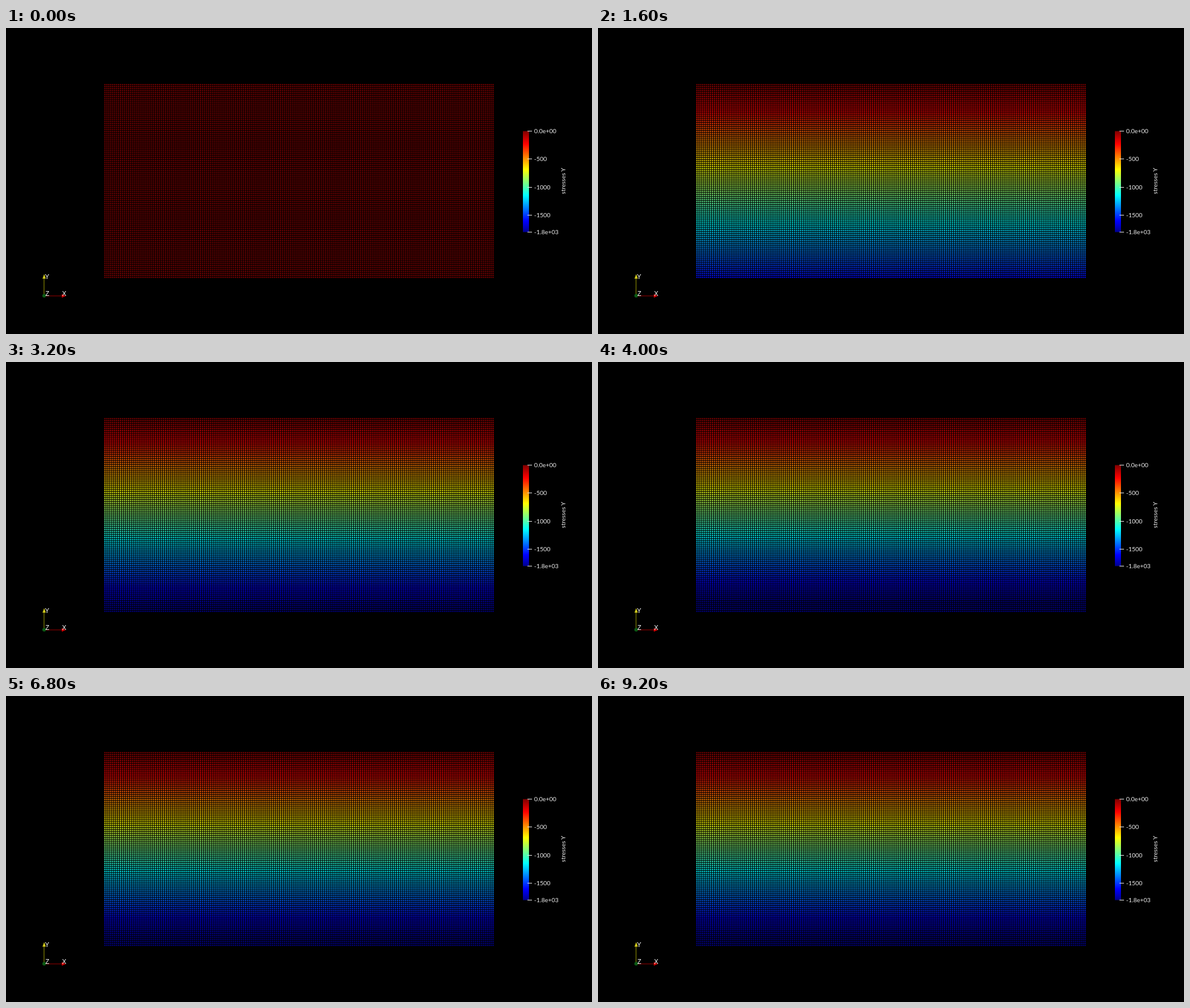
An HTML page with a canvas for the animation above (9600 ms loop, 967 by 506 pixels).

```html
<!DOCTYPE html>
<html lang="en">
<head>
<meta charset="utf-8">
<title>Vertical stress in a settling block</title>
<style>
  html, body { margin: 0; width: 100%; height: 100%; overflow: hidden; background: #000; }
  canvas, svg { position: absolute; left: 0; top: 0; width: 967px; height: 506px; }
  text { font-family: Lato, "Liberation Sans", sans-serif; font-size: 10px; fill: #ececec; }
  .axis text { font-family: "Liberation Sans", sans-serif; font-size: 10.5px; fill: #fff; }
</style>
</head>
<body>
<canvas id="field" width="967" height="506"></canvas>
<svg viewBox="0 0 967 506" xmlns="http://www.w3.org/2000/svg">
  <defs><linearGradient id="jet" x1="0" y1="1" x2="0" y2="0"></linearGradient></defs>
  <rect x="853" y="170.5" width="10" height="167" fill="url(#jet)"/>
  <g id="ticks"></g>
  <text transform="translate(923 253) rotate(-90)" text-anchor="middle">stresses Y</text>
  <g class="axis">
    <path d="M63 443H92" stroke="#960000"/>
    <path d="M62.8 442V414" stroke="#969600"/>
    <path d="M92 440L99 443L92 446Z" fill="#d00000"/>
    <path d="M60.2 414.5L63 407L65.8 414.5Z" fill="#d0c81c"/>
    <circle cx="63" cy="442.8" r="3" fill="#0c5a14"/>
    <text x="92.5" y="442.6">X</text>
    <text x="64.3" y="414.8">Y</text>
    <text x="65" y="442.6">Z</text>
  </g>
</svg>
<script>
const W = 967, H = 506;
const LOOP = 9600, STEP = 400;
const RANGE = 1796;
const COLS = 200, ROWS = 100, DOT = 2, PITCH = 3.218;
const LEFT = W / 2 - PITCH * (COLS - 1) / 2 - DOT / 2;
const TOP = H / 2 - PITCH * (ROWS - 1) / 2 - DOT / 2;

// Jet colour map: position, red, green, blue
const JET = [
  [0, 0, 0, 143], [0.111, 0, 0, 255], [0.365, 0, 255, 255], [0.492, 128, 255, 128],
  [0.619, 255, 255, 0], [0.873, 255, 0, 0], [1, 128, 0, 0]
];

function jet(v) {
  v = Math.min(1, Math.max(0, v));
  let k = 1;
  while (v > JET[k][0]) k++;
  const a = JET[k - 1], b = JET[k];
  const f = (v - a[0]) / (b[0] - a[0]);
  const mix = [1, 2, 3].map(c => Math.round(a[c] + (b[c] - a[c]) * f));
  return `rgb(${mix.join(",")})`;
}

function add(parent, name, attrs, label) {
  const el = document.createElementNS("http://www.w3.org/2000/svg", name);
  for (const key in attrs) el.setAttribute(key, attrs[key]);
  if (label) el.textContent = label;
  parent.appendChild(el);
}

function buildLegend() {
  const grad = document.getElementById("jet");
  for (const [offset] of JET) add(grad, "stop", { offset, "stop-color": jet(offset) });
  const ticks = document.getElementById("ticks");
  const labels = [[0, "0.0e+00"], [500, "-500"], [1000, "-1000"], [1500, "-1500"], [RANGE, "-1.8e+03"]];
  for (const [value, label] of labels) {
    const y = Math.floor(170.5 + value / RANGE * 167) + 0.5;
    add(ticks, "path", { d: `M860.5 ${y}H868`, stroke: "#e6e6e6" });
    add(ticks, "text", { x: 871.5, y: y + 3.3 }, label);
  }
}

// Gravity applied at once: damped swing around the static load
function load(t) {
  if (t === 0) return 0;
  return 1.04 * (1 - Math.exp(-0.00119 * t) * Math.cos(Math.PI * t / 800));
}

const ctx = document.getElementById("field").getContext("2d");

function draw(t) {
  const amount = load(t);
  ctx.fillStyle = "#000";
  ctx.fillRect(0, 0, W, H);
  for (let r = 0; r < ROWS; r++) {
    ctx.fillStyle = jet(1 - amount * (r + 0.5) / ROWS);
    ctx.fillRect(LEFT, TOP + r * PITCH, PITCH * (COLS - 1) + DOT, DOT);
  }
  // Cut the rows into dots
  ctx.fillStyle = "#000";
  for (let c = 0; c < COLS - 1; c++) {
    ctx.fillRect(LEFT + c * PITCH + DOT, TOP - 2, PITCH - DOT, PITCH * ROWS + 4);
  }
}

let shown = -1;
const start = performance.now();

function tick() {
  const step = Math.floor((performance.now() - start) % LOOP / STEP);
  if (step !== shown) draw((shown = step) * STEP);
  requestAnimationFrame(tick);
}

buildLegend();
tick();
</script>
</body>
</html>
```
